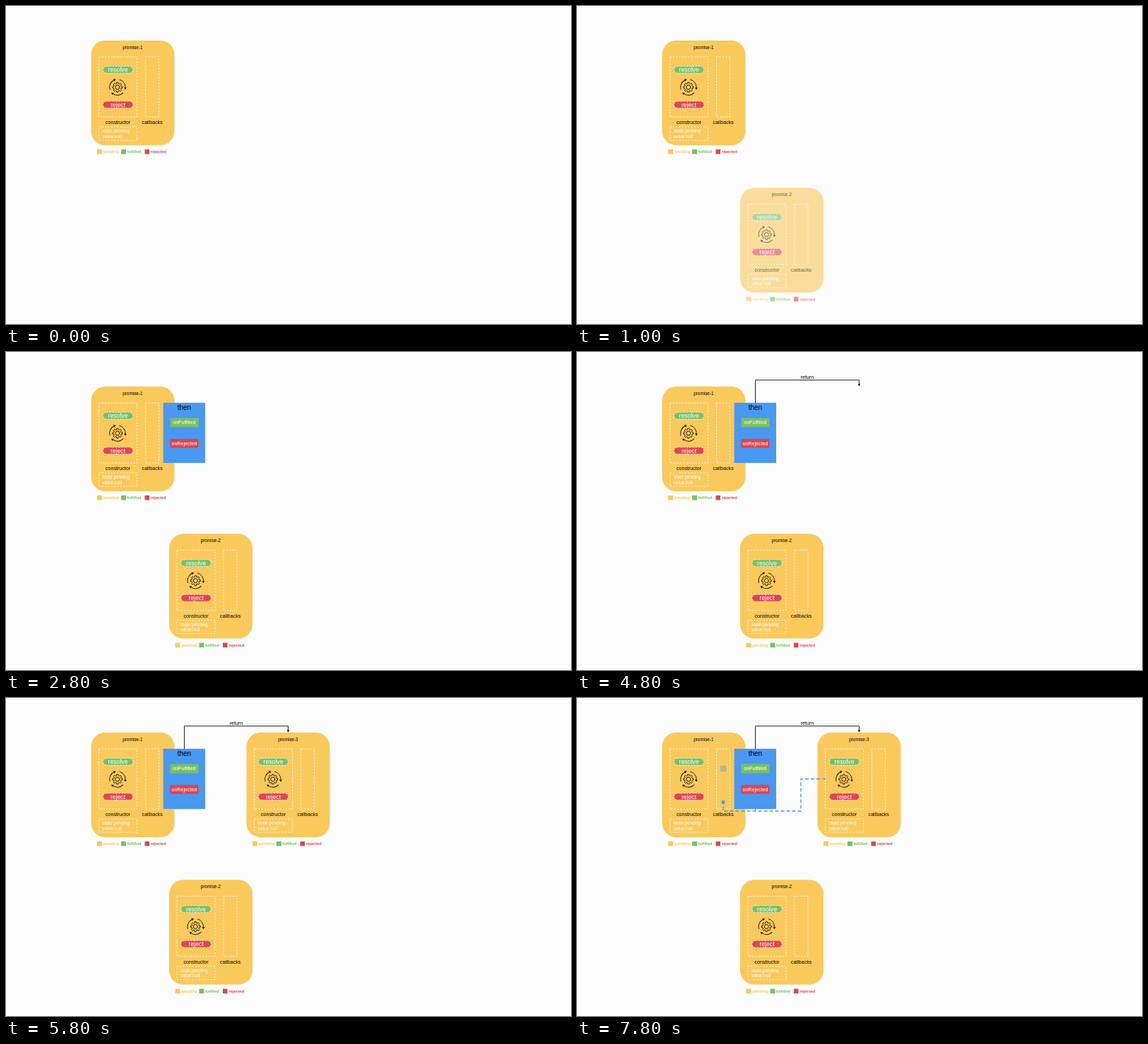
An HTML page that plays this animation: 800 by 450 pixels, repeating every 8000 ms.

```html
<!DOCTYPE html>
<html lang="en">
<head>
<meta charset="utf-8">
<title>Promise chain</title>
<style>
  html, body { margin: 0; width: 100%; height: 100%; overflow: hidden; background: #fcfcfc; }
  svg { display: block; width: 100%; height: 100%; font: 7.1px "Liberation Sans", Arial, sans-serif; }
  .mid { text-anchor: middle; }
  .name, .state { font-size: 6.4px; }
  .pill { font-size: 8.7px; }
  .legend { font-size: 5.67px; font-weight: bold; }
  .yellow { fill: #fac95c; }
  .green { fill: #7bc063; }
  .red { fill: #de4651; }
  .blue { fill: #4998f1; }
  .white { fill: #fff; }
  .slot { fill: none; stroke: #fff; stroke-width: .9; stroke-dasharray: 2 2.3; }
  .edge { stroke: #fff; stroke-width: .7; stroke-dasharray: 2.6 1.6; }
  .ink { fill: none; stroke: #1c1a14; stroke-width: .95; }
  .link { fill: none; stroke: #4998f1; stroke-width: 1.4; stroke-dasharray: 5 3; }

  .fade { animation: 8s linear -10ms infinite; }
  #second { animation-name: second; }
  #then { animation-name: then; }
  #return { animation-name: return; }
  #third { animation-name: third; }
  #wire { animation-name: wire; }
  #callback { animation-name: callback; }
  @keyframes second { 0%, 5% { opacity: 0; animation-timing-function: steps(5) } 17.5%, 100% { opacity: 1 } }
  @keyframes then { 0%, 20% { opacity: 0; animation-timing-function: steps(5) } 32.5%, 100% { opacity: 1 } }
  @keyframes return { 0%, 35% { opacity: 0; animation-timing-function: steps(5) } 47.5%, 100% { opacity: 1 } }
  @keyframes third { 0%, 60% { opacity: 0; animation-timing-function: steps(5) } 72.5%, 100% { opacity: 1 } }
  @keyframes wire { 0%, 75% { opacity: 0; animation-timing-function: steps(5) } 87.5%, 100% { opacity: 1 } }
  @keyframes callback { 0%, 92.5% { opacity: 0; animation-timing-function: steps(3) } 100% { opacity: .6 } }
</style>
</head>
<body>
<svg viewBox="0 0 800 450">
  <defs>
    <g id="arrow">
      <path class="ink" d="M2.5 -10.9A11.2 11.2 0 0 1 11.2 1"/>
      <path d="M9.3 .6H13.1L11.1 3.8Z" fill="#1c1a14"/>
    </g>
    <g id="card">
      <rect class="yellow" x="120.5" y="48.8" width="118" height="148.2" rx="20"/>
      <rect class="slot" x="131.5" y="72" width="54" height="85"/>
      <rect class="slot" x="197.5" y="72" width="19" height="85"/>
      <rect class="slot" x="131.5" y="171" width="54" height="19"/>
      <g class="pill mid">
        <rect class="green edge" x="137.3" y="85.2" width="42.4" height="9.8" rx="4.9"/>
        <text class="white" x="158.5" y="93">resolve</text>
        <rect class="red edge" x="137.3" y="134.7" width="42.4" height="9.8" rx="4.9"/>
        <text class="white" x="158.5" y="142.5">reject</text>
      </g>
      <g transform="translate(157.8 115)">
        <path id="gear" class="ink"/>
        <circle class="ink" r="3"/>
        <use href="#arrow"/>
        <use href="#arrow" transform="rotate(120)"/>
        <use href="#arrow" transform="rotate(240)"/>
      </g>
      <text class="mid" x="158.5" y="167">constructor</text>
      <text class="mid" x="207.2" y="167">callbacks</text>
      <text class="white state" x="136.8" y="179">state:pending</text>
      <text class="white state" x="136.8" y="186.6">value:null</text>
      <g class="legend">
        <g class="yellow"><rect x="129" y="203" width="7" height="6.5"/><text x="138" y="208.2">pending</text></g>
        <g class="green"><rect x="163" y="203" width="7" height="6.5"/><text x="171.4" y="208.2">fulfilled</text></g>
        <g class="red"><rect x="196.5" y="203" width="6.5" height="6.5"/><text x="205" y="208.2">rejected</text></g>
      </g>
    </g>
  </defs>

  <g>
    <use href="#card"/>
    <text class="name mid" x="179.4" y="60.6">promise-1</text>
  </g>
  <g id="second" class="fade">
    <g transform="translate(110.5 208.5)">
      <use href="#card"/>
      <text class="name mid" x="179.4" y="60.6">promise-2</text>
    </g>
  </g>
  <g id="third" class="fade">
    <g transform="translate(220 0)">
      <use href="#card"/>
      <text class="name mid" x="179.4" y="60.6">promise-3</text>
    </g>
  </g>
  <g id="return" class="fade">
    <path d="M252.5 72V39.7H399.5V46" fill="none" stroke="#222"/>
    <path d="M397.7 45.3H401.3L399.5 48.8Z" fill="#111"/>
    <text class="mid" x="326" y="38">return</text>
  </g>
  <g id="then" class="fade mid">
    <rect class="blue" x="222.7" y="71.8" width="59.3" height="85.2"/>
    <text x="252.4" y="81.6" font-size="10">then</text>
    <rect class="green" x="232.4" y="93.5" width="40.2" height="13"/>
    <text class="white" x="252.4" y="102.3">onFulfilled</text>
    <rect class="red" x="232.4" y="122.9" width="40.2" height="12.8"/>
    <text class="white" x="252.4" y="131.8">onRejected</text>
  </g>
  <g id="wire" class="fade">
    <path class="link" d="M352 114.5H317V160H207V150M252.5 157V160"/>
    <rect class="blue" x="204.7" y="145.2" width="4.6" height="4.6"/>
  </g>
  <rect id="callback" class="fade blue" x="202.8" y="95.8" width="8.6" height="8.4"/>
</svg>
<script>
  const teeth = 8;
  const outline = [];
  for (let i = 0; i < teeth; i++) {
    for (const [radius, shift] of [[5.3, -.33], [7, -.2], [7, .2], [5.3, .33]]) {
      const angle = (i + shift) / teeth * 2 * Math.PI;
      outline.push(`${radius * Math.cos(angle)} ${radius * Math.sin(angle)}`);
    }
  }
  document.getElementById('gear').setAttribute('d', `M${outline.join('L')}Z`);
</script>
</body>
</html>
```
